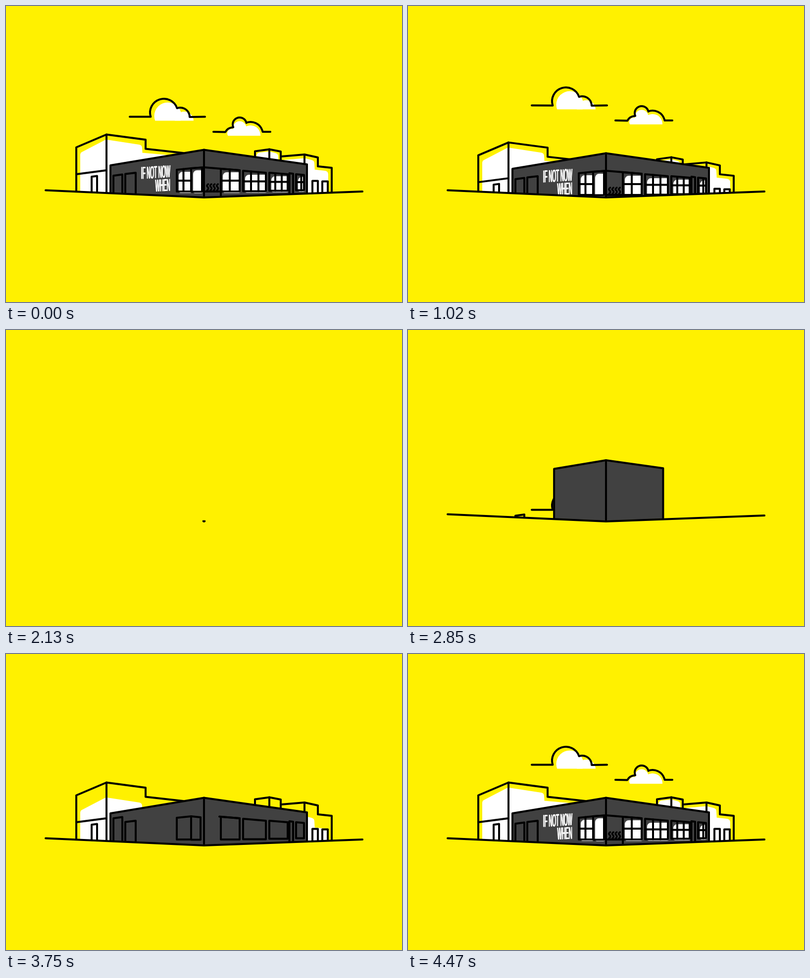
Recreate the animation shown at these times as an HTML page with a canvas. Size 800x600 px, loop 4.5 s.

```html
<!DOCTYPE html>
<html lang="en">
<head>
<meta charset="utf-8">
<title>Building pop-up</title>
<style>
html, body { margin: 0; height: 100%; overflow: hidden; background: #fff100; }
canvas { display: block; }
</style>
</head>
<body>
<canvas id="stage" width="800" height="600"></canvas>
<script>
const ctx = document.getElementById('stage').getContext('2d');
const LOOP = 4500, YELLOW = '#fff100', GRAY = '#414141', DEEP = 420;
const clamp = v => Math.min(1, Math.max(0, v));

// Eased value through [time, value] stops
function key(t, ...stops) {
  let [t0, v0] = stops[0];
  for (const [t1, v1] of stops) {
    if (t < t1) {
      const p = clamp((t - t0) / (t1 - t0 || 1));
      return v0 + (v1 - v0) * p * p * (3 - 2 * p);
    }
    [t0, v0] = [t1, v1];
  }
  return v0;
}

function path(...xy) {
  const p = new Path2D();
  for (let i = 0; i < xy.length; i += 2) p.lineTo(xy[i], xy[i + 1]);
  return p;
}

function line(...xy) { ctx.stroke(path(...xy)); }

function fill(color, shape) {
  ctx.fillStyle = color;
  ctx.fill(shape);
}

function shifted(dy, draw) {
  ctx.save();
  ctx.translate(0, dy);
  draw();
  ctx.restore();
}

// Yellow block with a soft white surface that slides up inside it
function block(outline, surface, whiteDy) {
  const body = path(...outline, outline.at(-2), DEEP, outline[0], DEEP);
  fill(YELLOW, body);
  ctx.save();
  ctx.clip(body);
  ctx.translate(0, whiteDy);
  const shape = path(...surface);
  shape.closePath();
  ctx.strokeStyle = '#fff';
  ctx.lineWidth = 14;
  fill('#fff', shape);
  ctx.stroke(shape);
  ctx.restore();
  line(...outline);
}

function door(x0, y0, x1, y1) { line(x0, DEEP, x0, y0, x1, y1, x1, DEEP); }

function glazing(x0, y0, x1, y1, bottom, grow, bars, mid) {
  if (grow > 0) {
    const top = bottom - (bottom - Math.max(y0, y1) - 4) * grow;
    const glass = new Path2D();
    glass.roundRect(x0 + 4, top, x1 - x0 - 2, bottom + 3 - top, [8, 5, 4, 4]);
    fill('#fff', glass);
    for (const x of bars) {
      const y = y0 + (y1 - y0) * (x - x0) / (x1 - x0);
      line(x, bottom, x, bottom - (bottom - y) * grow);
    }
    if (mid) line(x0, mid, x0 + (x1 - x0) * grow, mid);
  }
  const frame = path(x0, y0, x1, y1, x1, bottom, x0, bottom);
  frame.closePath();
  ctx.stroke(frame);
}

function cloud(x0, x1, y, arcs, puffs, base) {
  ctx.save();
  ctx.beginPath();
  ctx.rect(x0, 0, x1 - x0, base);
  ctx.clip();
  for (const [x, cy, r] of puffs) {
    const puff = new Path2D();
    puff.arc(x, cy, r, 0, 7);
    fill('#fff', puff);
  }
  ctx.restore();
  const outline = path(x0, y);
  arcs.forEach(a => outline.arc(...a));
  outline.lineTo(x1, y);
  ctx.stroke(outline);
}

function clouds() {
  cloud(250, 402, 224.5,
    [[319, 216, 28, 2.83, 5.96], [352, 225, 19, 4.39, 6.28]],
    [[327, 223, 27.5], [360, 233, 19]], 232.5);
  cloud(419, 534, 255,
    [[459, 264, 18, 3.64, 4.65], [472, 240, 14, 2.72, 6.07], [494, 260, 25, 4.38, 6.08]],
    [[456, 258, 9], [472, 247, 13.5], [472, 258, 12], [494, 262, 20]], 263);
}

function rightBlocks(white, doorDy) {
  block([550, 305.5, 603, 301, 630, 307, 630, 325, 658, 328, 658, DEEP],
    [550, 320, 603, 315.5, 616, 319, 617, 338, 644, 341, 644, DEEP, 550, DEEP], white);
  line(603, 301, 603, DEEP);
  block([503, DEEP, 503, 294.5, 532, 290.5, 555, 295, 555, 312],
    [513, 304, 532, 302, 543, 305, 543, DEEP, 513, DEEP], white);
  line(532, 290.5, 532, DEEP);
  shifted(doorDy, () => {
    door(619, 354.5, 630, 354.5);
    door(639, 355.5, 650, 355.5);
  });
}

function leftBlock(white) {
  block([142, DEEP, 142, 286.5, 203, 260.5, 282, 271, 282, 289.5, 358, 298],
    [157, DEEP, 157, 302, 203, 278, 268, 288, 269, 304, 360, 312, 360, DEEP], white);
  line(203, 260.5, 203, DEEP);
  line(142, 341, 203, 333);
  door(173, 346, 184, 344.5);
}

function sign() {
  ctx.fillStyle = '#fff';
  ctx.font = '35px "Liberation Sans", Arial, sans-serif';
  ctx.textAlign = 'right';
  [['IF NOT NOW', 347], ['WHEN', 374.5]].forEach(([words, y]) => {
    for (const dx of [0, .7, 1.4]) {
      ctx.save();
      ctx.transform(.28, -.017, 0, 1, 331 + dx, y);
      ctx.fillText(words, 0, 0);
      ctx.restore();
    }
  });
}

function steam() {
  ctx.lineWidth = 3.5;
  for (let i = 0; i < 4; i++)
    ctx.stroke(new Path2D(`M${408.5 + i * 6.6} 361c-4 3-3 4-1 6s2 4-1.5 7`));
  ctx.lineWidth = 4;
}

function mainHouse(t) {
  const w = key(t, [2690, 0], [2990, 1]);
  const left = 400 - 189 * w, right = 400 + 208 * w;
  const house = path(left, DEEP, left, 291.5 + 31.5 * w, 400, 291.5,
    right, 291.5 + 29.5 * w, right, DEEP);
  fill(GRAY, house);
  ctx.stroke(house);
  line(400, 291.5, 400, DEEP);

  shifted(key(t, [3550, 60], [3750, -11], [3900, 0]), () => door(217, 344, 235, 341.5));
  const rise = key(t, [3350, 110], [3560, -10], [3700, 0]);
  const grow = key(t, [3770, 0], [3980, 1]);
  shifted(rise, () => {
    door(241, 340.5, 262, 338);
    glazing(345, 332, 374, 329, 376, grow, [358.5], 354);
    glazing(374, 329, 393 + 3 * grow, 331 - 3.5 * grow, 376.5, grow, []);
    glazing(434, 330, 472, 333, 376, grow, [452], 354);
    glazing(479, 334, 525, 338, 375.5, grow, [495, 510], 355.5);
    glazing(532, 338, 569, 341, 374.5, grow, [544, 557], 356.5);
    door(572.5, 339, 580, 340);
    glazing(586, 341, 602, 342.5, 373.5, grow, [596.5], 357);
  });

  // Canopy runs from the window towards the corner, then along the left wall
  const x = key(t, [3680, 472], [3810, 400]);
  if (x < 472) line(x, 327 + (x - 400) * .083, 472, 333);
  if (grow > 0) {
    line(400, 327, 400 - 26 * grow, 327 + 2 * grow);
    line(434, 376, 434 - 34 * grow, 376);
    line(434, 376, 434, 376 + 12 * grow);
  }
  shifted(key(t, [3780, 90], [3980, -8], [4120, 0]), () => { sign(); steam(); });
}

function ground(t) {
  let length = 320.3, bend = 0;
  if (t < 2130) {
    length *= 1 - clamp((t - 1050) / 600) ** 4.8;
    bend = 87.6 * clamp((t - 1050) / 540) ** 2;
  } else {
    length *= 1 - (1 - clamp((t - 2130) / 700)) ** 3;
    bend = t < 2640 ? 13.5 - 20.9 * (t - 2130) / 510 : key(t, [2640, -7.4], [2820, 0]);
  }
  const tip = (side, rest) => {
    const a = (rest + bend) * Math.PI / 180;
    return [400 + side * length * Math.cos(a), 388 - length * Math.sin(a)];
  };
  return [...tip(-1, 2.6), 400, 388, ...tip(1, 2.15)];
}

function scene(t) {
  const fall = Math.max(0, (t - 500) / 1000);
  const leaving = t < 1650;
  const build = leaving ? LOOP : t;
  const sink = power => leaving ? fall ** power : 0;
  const sideSink = 114 * sink(3);
  const white = key(build, [3600, 110], [3750, 20], [3860, -4], [3980, 0]);

  shifted(key(build, [3800, 140], [4020, -60], [4260, 3], [4400, 0])
    + 308 * sink(3) - 245 * sink(2), clouds);
  shifted(key(build, [2960, 100], [3090, -8], [3180, 0]) + sideSink,
    () => rightBlocks(white, key(build, [3300, 50], [3500, -6], [3620, 0])));
  shifted(key(build, [3190, 130], [3450, -24], [3600, 0]) + sideSink,
    () => leftBlock(white));
  shifted(key(build, [2660, 97], [2760, -56], [2940, 0]) + 133 * sink(4.5),
    () => mainHouse(build));
}

function frame(now) {
  const t = now % LOOP;
  fill(YELLOW, path(0, 0, 800, 0, 800, 600, 0, 600));
  ctx.strokeStyle = '#000';
  ctx.lineWidth = 4;
  ctx.lineCap = ctx.lineJoin = 'round';
  const floor = ground(t);
  if (t < 1650 || t > 2640) {
    ctx.save();
    ctx.clip(path(...floor, floor[4], -100, floor[0], -100));
    scene(t);
    ctx.restore();
  }
  line(...floor);
  requestAnimationFrame(frame);
}
requestAnimationFrame(frame);
</script>
</body>
</html>
```
